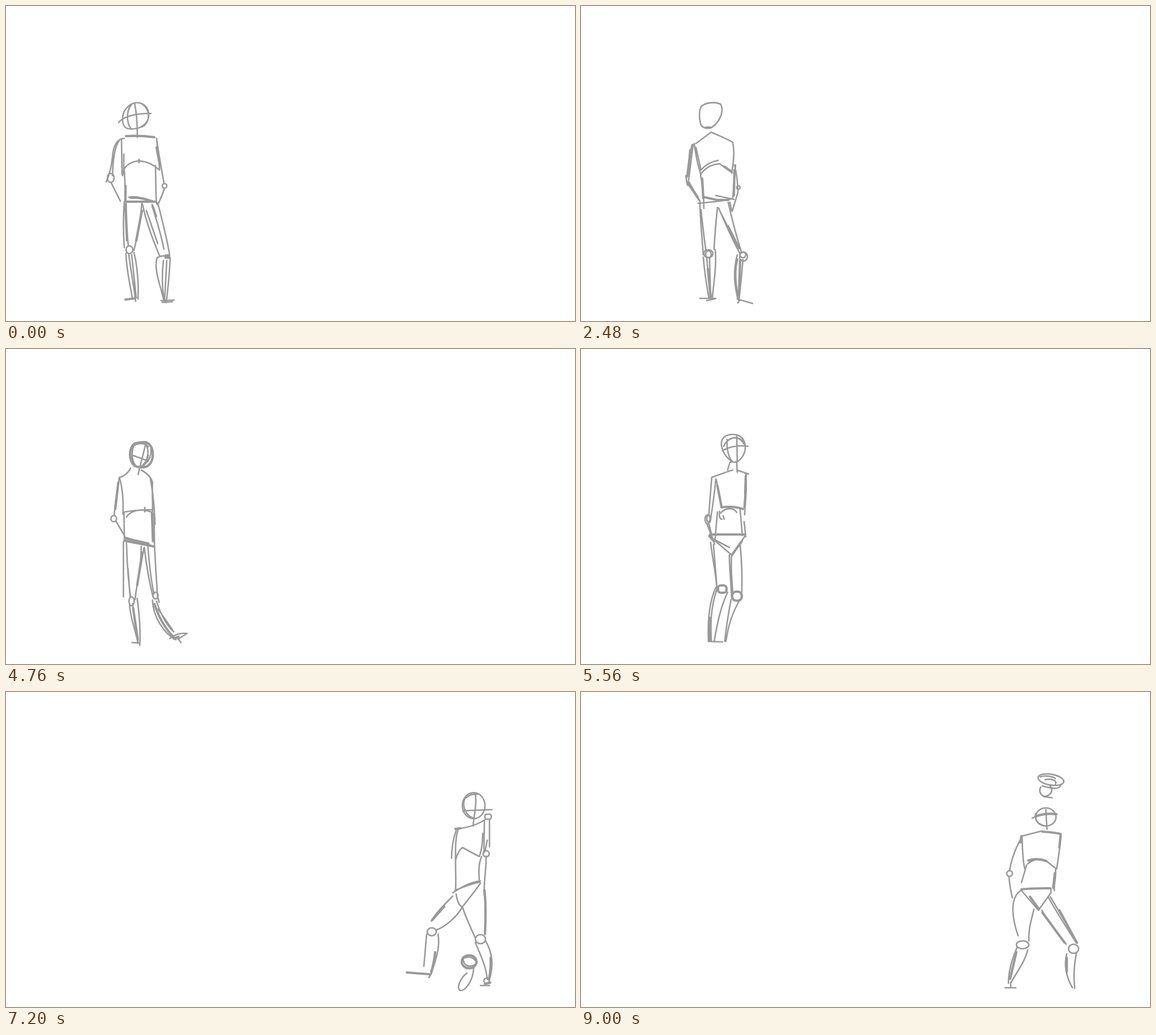
Recreate the animation shown at these times as an HTML page without scripts. Size 1005 px wide and 557 px high, loop 9120 ms.

```html
<!DOCTYPE html>
<html lang="en">
<head>
<meta charset="utf-8">
<title>Sketch figure</title>
<style>
html, body { margin: 0; width: 100%; height: 100%; overflow: hidden; background: #fff; }
svg { display: block; width: 100vw; height: 100vh; fill: none; stroke: #999; stroke-width: 2.6; stroke-linecap: round; stroke-linejoin: round; }
svg * { vector-effect: non-scaling-stroke; }
.bold { stroke-width: 4.2; }
.pose { visibility: hidden; transform-origin: 235px 526px; animation: 9120ms step-end infinite; }
#stand { animation-name: stand; }
#lean { animation-name: lean; }
#step { animation-name: step; }
#wait { animation-name: wait; transform-origin: 245px 520px; }
#lunge { animation-name: lunge; transform-origin: 785px 520px; }
#crouch { animation-name: crouch; transform-origin: 815px 524px; }
#ball { animation-name: ball; transform-origin: 816px 527px; }
#hat { animation-name: hat; transform-origin: 830px 188px; }

@keyframes stand {
  0%, 10.08%, 20.17%, 30.26%, 40.35% { visibility: visible; transform: none; }
  1.75%, 12.71%, 21.92%, 32.01% { visibility: visible; transform: scaleY(1.02); }
  3.94%, 14.47%, 24.56%, 34.64%, 41.66%, 100% { visibility: hidden; transform: none; }
  8.77%, 18.85%, 28.94%, 39.03% { visibility: visible; transform: translate(1px, 4px); }
}
@keyframes lean {
  3.94%, 14.47%, 24.56%, 34.64% { visibility: visible; transform: scale(1.05, 1.015); }
  5.26%, 15.78%, 25.87%, 35.96% { visibility: visible; transform: scale(1.03, 1.005); }
  7.01%, 17.1%, 27.19%, 37.28% { visibility: visible; transform: none; }
  7.89%, 17.98%, 28.07%, 38.15% { visibility: visible; transform: translateY(5px); }
  8.77%, 18.85%, 28.94%, 39.03% { visibility: hidden; }
}
@keyframes step {
  41.66% { visibility: visible; transform: none; }
  42.98% { visibility: visible; transform: scaleX(1.04); }
  45.61% { visibility: visible; transform: translateX(2px) scaleX(1.08); }
  46.92% { visibility: visible; transform: translateX(3px) scaleX(1.11); }
  48.24% { visibility: visible; transform: translateX(3px) scaleX(1.08); }
  50.43% { visibility: visible; transform: none; }
  52.19% { visibility: visible; transform: translate(3px, -2px) scaleX(.9); }
  53.28% { visibility: visible; transform: translate(7px, -4px) scaleX(.86); }
  54.38% { visibility: visible; transform: translate(11px, -6px) scaleX(.82); }
  55.48% { visibility: visible; transform: translate(15px, -8px) scaleX(.78); }
  56.57% { visibility: hidden; }
}
@keyframes wait {
  56.57% { visibility: visible; transform: translate(-13px, 8px); }
  57.67% { visibility: visible; transform: translate(-9px, 6px); }
  58.77% { visibility: visible; transform: translate(-6px, 4px); }
  59.86% { visibility: visible; transform: translate(-3px, 2px); }
  60.96% { visibility: visible; transform: none; }
  62.28% { visibility: visible; transform: translate(4px, -3px) skewX(-4deg); }
  63.15% { visibility: visible; transform: translate(230px, -2px) skewX(-12deg); }
  64.47% { visibility: hidden; }
}
@keyframes lunge {
  64.47% { visibility: visible; transform: translate(-130px, -15px) skewX(-8deg); }
  65.78% { visibility: visible; transform: translate(105px, -28px); }
  67.54% { visibility: visible; transform: translate(70px, -15px) scaleX(1.15); }
  69.29% { visibility: visible; transform: translate(30px, 0) scaleX(1.4); }
  71.05% { visibility: visible; transform: translate(12px, 0) scaleX(1.45); }
  72.8% { visibility: visible; transform: translate(6px, 0) scaleX(1.35); }
  74.12% { visibility: visible; transform: translate(4px, 0) scaleX(1.25); }
  75.43% { visibility: visible; transform: translate(3px, 0) scaleX(1.15); }
  77.19% { visibility: visible; transform: translate(2px, 0) scaleX(1.08); }
  78.94% { visibility: visible; transform: none; }
  80.7% { visibility: visible; transform: translate(5px, 0) scaleY(.985); }
  82.01% { visibility: visible; transform: translate(11px, 0) scale(.97); }
  83.33% { visibility: visible; transform: translate(17px, 0) scale(.96, .95); }
  84.64% { visibility: visible; transform: translate(22px, 0) scale(.95, .94); }
  85.96% { visibility: hidden; }
}
@keyframes crouch {
  85.96% { visibility: visible; transform: translateX(14px) scaleY(1.04); }
  87.28% { visibility: visible; transform: translateX(18px) scaleY(1.03); }
  88.59% { visibility: visible; transform: translateX(23px) scaleY(1.02); }
  89.91% { visibility: visible; transform: translateX(27px); }
  91.22% { visibility: visible; transform: translateX(19px); }
  92.54% { visibility: visible; transform: translateX(11px); }
  94.29% { visibility: visible; transform: translateX(5px); }
  95.61%, 100% { visibility: visible; transform: none; }
}
@keyframes ball {
  77.19% { visibility: visible; transform: translateY(-12px); }
  78.94%, 80.7% { visibility: visible; transform: none; }
  82.01% { visibility: visible; transform: translate(2px, -50px); }
  83.33% { visibility: visible; transform: translate(4px, -130px); }
  84.64% { visibility: visible; transform: translate(6px, -210px); }
  85.96% { visibility: visible; transform: translate(8px, -280px); }
  87.28% { visibility: hidden; }
}
@keyframes hat {
  87.28% { visibility: visible; transform: translate(8px, 4px) scaleY(.8); }
  89.91% { visibility: visible; transform: translate(6px, 3px) scaleY(.75); }
  92.54% { visibility: visible; transform: translate(3px, 1px) scaleY(.75); }
  95.61% { visibility: visible; transform: scaleY(.75); }
  97.36% { visibility: visible; transform: scaleY(.88); }
  98.68%, 100% { visibility: visible; transform: none; }
}
</style>
</head>
<body>
<svg viewBox="0 0 1005 557">
  <g class="pose" id="stand">
    <path class="bold" d="M212 230C230 229 248 230 262 232M212 346H264M266 250L272 282M211 318V345M220 339Q240 338 256 345M211 519L228 517M282 441H288V445H282ZM259 354L265 372M240 362L230 415"/>
    <path d="M231 171C248 171 255 186 251 200C246 213 232 219 216 217C205 215 204 200 208 188C213 178 222 171 231 171M222 174C212 184 213 206 220 216M240 173C256 184 255 206 240 214M227 172C231 190 232 210 232 232M199 206C210 192 235 190 256 190"/>
    <path d="M204 236L205 298M208 262V295M266 234C268 255 271 275 271 290M206 300C206 280 225 274 237 274C250 275 262 282 271 290M235 271V277M209 290C210 310 211 330 211 345M264 282L265 336L266 350M217 338C230 335 245 341 260 345M209 234C195 234 189 250 188 268C186 285 182 300 177 311M200 238C191 250 189 275 188 300M186 313L202 345M266 234C270 265 274 285 279 313M280 322C276 335 271 345 268 352"/>
    <path d="M209 346C207 370 207 400 209 427M212 346C213 370 213 395 216 424M210 350L213 415M240 348C238 375 233 405 226 432M212 437C212 460 218 490 223 515M217 440C220 465 225 490 229 522M226 436C231 455 235 490 233 518M222 440L230 516"/>
    <path d="M241 350C247 380 260 415 271 441M248 362L268 420M258 351C264 375 272 395 279 430M268 348C275 375 284 410 289 440M267 445C275 440 282 442 289 444M267 445C262 460 268 480 272 495C275 505 277 515 280 524M290 445C289 470 286 500 283 525M278 450C275 475 276 500 279 520M284 450L280 522M274 521L297 520M276 524L294 523"/>
    <ellipse cx="185" cy="304" rx="6" ry="8"/><circle cx="280" cy="318" r="4"/><ellipse cx="218" cy="431" rx="6" ry="7"/>
  </g>

  <g class="pose" id="lean">
    <path class="bold" d="M221 215H229M253 284L266 293M218 338L240 343L260 343M193 255L189 300M188 312L206 338M276 448C271 465 272 490 277 515M281 450L279 510M271 290L270 335M214 305L216 340M260 390L279 428M224 465L229 514"/>
    <path d="M212 178C220 170 238 169 247 174C252 184 248 202 232 214C225 218 214 217 211 208C208 195 209 185 212 178M203 243L230 223C245 230 260 236 268 241C271 255 270 275 266 295M200 243C203 265 207 285 212 298M203 250L212 290M211 298C220 285 232 280 245 279L267 295M212 290C220 280 232 275 242 273M211 298C214 315 217 330 217 358M273 281L268 340M207 349C225 347 245 346 263 342M238 335L270 342"/>
    <path d="M196 245C192 265 188 285 187 303M198 245L190 308M185 300L188 317M186 310L208 343M190 310L210 345M271 281C276 300 277 315 277 330L267 363M263 347L266 362"/>
    <path d="M210 345C210 370 213 400 216 440M212 360C215 390 217 410 221 434M241 356C238 385 236 410 235 430M216 444C218 470 222 495 226 517M222 445L229 517M227 445L229 517M237 431C240 460 234 490 232 517M210 517H238M222 521L236 518"/>
    <path d="M243 357C255 385 268 415 281 438M246 364L277 425M260 347C266 375 274 405 283 434M276 440C268 470 271 495 278 520M286 448C284 475 281 500 279 522M276 518L303 526M277 525L281 520"/>
    <ellipse cx="225" cy="438" rx="8" ry="7"/><ellipse cx="225" cy="439" rx="5" ry="6"/><ellipse cx="287" cy="443" rx="7" ry="8"/><circle cx="286" cy="440" r="5"/><circle cx="278" cy="321" r="3"/>
  </g>

  <g class="pose" id="step">
    <path class="bold" d="M237 167C254 164 261 180 258 195C254 212 240 213 227 210C213 206 211 185 218 174C222 167 230 168 237 167M215 180C213 192 216 204 224 209M203 341L260 351M206 337L250 346M257 292L259 342M220 460L229 515M262 453Q274 488 300 512M300 514L309 511M191 238L185 285M238 362L228 420"/>
    <path d="M222 172C215 185 218 205 228 210M222 172C232 168 244 168 250 175M244 170C253 180 250 200 236 210M255 176C257 194 248 205 234 211M250 190Q247 205 236 212M245 168C240 190 234 205 230 224M219 190L250 200M215 213C210 222 200 228 193 229C200 250 201 275 200 294M236 216C248 222 256 230 258 238C257 260 259 280 258 290M254 232C260 260 262 290 263 312M200 291C215 287 235 287 257 286M207 299C215 288 235 283 255 290M243 282V290M202 292L203 342M261 292L262 348M205 335C225 341 245 345 260 351"/>
    <path d="M193 229C188 255 184 275 183 297M186 306L203 332M201 343V440M207 345C208 380 211 415 215 441M210 390L214 440M241 354C236 385 226 420 224 445M236 351L235 375M213 455C215 480 225 500 229 520M219 452C222 480 226 500 230 522M228 443C232 470 235 500 233 526M218 521L233 522"/>
    <path d="M242 353C246 385 252 415 259 440M249 352C252 385 256 415 261 435M262 350C264 385 266 415 268 440Q270 445 271 450M258 446C259 475 280 505 304 516M266 448C275 475 290 495 300 502M269 462L297 498M292 514C305 505 315 504 326 505L308 515M306 512L314 521"/>
    <circle cx="182" cy="302" r="5.5"/><ellipse cx="217" cy="448" rx="5" ry="8"/><ellipse cx="264" cy="438" rx="5" ry="6"/>
  </g>

  <g class="pose" id="wait">
    <path class="bold" d="M241 242L248 278M248 280C262 278 275 279 286 283M228 328H289M227 331L235 340M284 340L268 362M227 475Q226 500 228 515M291 225L290 255"/>
    <path d="M248 165C250 150 270 148 282 155C292 163 293 180 284 192C278 200 270 202 265 198C255 190 247 178 248 165M252 172C258 158 275 150 288 165M258 160C257 180 262 195 268 199M275 152L276 200M250 180C262 172 280 170 295 172M262 160C270 155 280 155 288 168M263 200L259 214M275 200L276 218M265 200H276"/>
    <path d="M231 227C245 222 255 218 268 214M275 214L296 221M239 231C242 250 246 265 248 280M291 220C294 245 290 270 289 293M292 222L288 280M247 290C255 280 270 280 275 289M245 287C243 297 246 301 249 301M251 295L253 301M241 288L237 335M281 284L285 330M288 305L291 332M226 330L267 365L290 330M230 334L262 351M231 227C229 250 227 275 226 293M238 230C236 255 233 275 229 300M226 309L233 338M222 308L236 345"/>
    <path d="M229 342C232 370 238 395 240 423M234 346L240 420M262 364C262 390 265 410 266 440M238 422C225 450 224 490 225 516M240 425C228 460 229 490 230 516M259 430C245 460 240 490 235 518M225 517L250 518M266 364C264 390 267 410 268 432M281 345C284 375 285 400 284 430M265 443C260 470 256 495 254 517M279 446C266 470 260 490 256 517"/>
    <ellipse cx="224" cy="301" rx="5" ry="8"/><ellipse cx="225" cy="300" rx="3" ry="6"/>
    <rect x="242" y="418" width="15" height="13" rx="5" class="bold"/><rect x="267" y="429" width="17" height="16" rx="7" class="bold"/>
  </g>

  <g class="pose" id="lunge">
    <path class="bold" d="M794 242L803 241M845 350C848 375 847 405 846 428M708 496L748 499M753 403L774 379M846 516L855 514M758 460Q756 480 751 495M856 470Q857 490 853 508"/>
    <path d="M812 185C803 200 812 222 830 224M813 187Q821 179 832 181M828 178C833 195 826 220 825 237M807 210L858 208M793 242C810 241 830 236 846 226M800 240C793 255 794 280 794 298M795 245C788 265 787 280 787 294M794 298C797 285 802 278 806 275L836 291C842 275 842 260 842 250M794 298C794 320 795 335 794 352M840 291C834 305 835 320 836 334M789 355C805 345 820 336 838 334M793 351Q815 341 837 336M795 357C797 370 800 378 806 380C818 365 830 350 838 338M845 228L844 285M854 225V274M850 262L846 282"/>
    <path d="M848 290C848 320 843 340 845 360M806 380C813 400 822 420 829 435M829 443C838 465 848 485 850 508M847 440C862 465 860 490 853 512M838 519H854M789 361C775 375 760 390 751 405M806 380C795 400 775 415 760 421M743 428L738 485M763 428C768 455 756 480 751 499M747 505L751 498"/>
    <ellipse cx="826" cy="201" rx="20" ry="23"/><rect x="846" y="216" width="11" height="9" rx="3"/><circle cx="848" cy="286" r="5.5"/><ellipse cx="838" cy="437" rx="9" ry="8"/><circle cx="849" cy="511" r="5"/><ellipse cx="752" cy="424" rx="8" ry="7"/>
  </g>

  <g class="pose" id="ball">
    <ellipse class="bold" cx="818" cy="477" rx="13" ry="11.5"/>
    <path d="M808 468C806 482 816 489 828 482M811 470Q822 466 829 475M814 497C803 505 796 522 801 527C810 532 825 510 826 489"/>
  </g>

  <g class="pose" id="crouch">
    <path class="bold" d="M778 255L776 266M815 247Q835 248 847 251M778 349C795 347 815 347 828 347M790 298Q806 293 822 299M837 320L834 346M793 362L809 384M815 390L854 443M845 386L875 442M803 220Q820 214 839 216M769 460L758 507M858 470V495M847 254L845 275"/>
    <path d="M797 223C810 215 825 213 841 216M821 208L823 243M803 215C800 228 810 235 820 237M778 255L813 246M779 256C780 280 780 300 784 313M848 251C846 275 843 295 840 313M789 304C800 294 815 294 822 299L840 313M787 306L778 337M838 314C840 325 835 340 836 351M777 350L808 386L830 355V347M779 257C770 270 760 295 757 316M756 326C757 345 760 355 762 364"/>
    <path d="M777 351C755 365 763 405 772 431M800 384C795 405 790 420 791 440M770 452C760 475 755 495 755 515M789 456C785 475 770 495 760 513M759 513V523M749 523H768M814 386C825 405 840 425 857 446M825 362C840 390 860 420 875 444M829 362L877 444M858 463C852 485 858 505 868 523M875 462C870 485 870 505 872 524"/>
    <ellipse cx="821" cy="221" rx="18" ry="16"/><circle cx="757" cy="321" r="5"/><ellipse cx="780" cy="447" rx="11" ry="7"/><ellipse cx="870" cy="454" rx="9" ry="8"/>
  </g>

  <g class="pose" id="hat">
    <ellipse cx="830" cy="155" rx="23" ry="9.5" transform="rotate(10 830 155)"/>
    <path d="M811 150C820 147 832 149 838 153M820 155C832 152 842 158 838 163M812 168C808 175 812 186 822 184C834 180 833 170 828 166M815 166C835 172 845 172 847 165M817 185L832 187"/>
  </g>
</svg>
</body>
</html>
```
